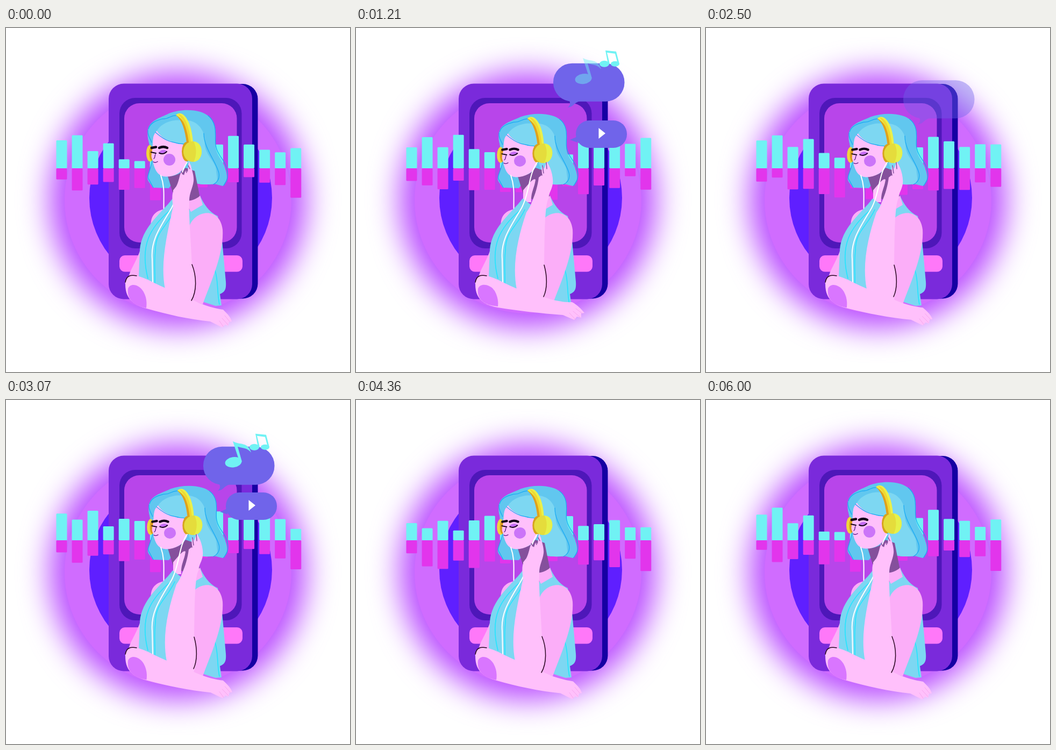
These frames come from a looping animation (640x640 px, 6.07 s). An HTML page:

```html
<!DOCTYPE html>
<html lang="en">
<head>
<meta charset="utf-8">
<title>Listening to music</title>
<style>
  html, body { margin: 0; width: 100%; height: 100%; overflow: hidden; background: #fff; }
  svg { display: block; width: 100%; height: 100%; }
  .hair { fill: #61c7ef; }
  .hairLight, .vest { fill: #7dd7f2; }
  .skin { fill: #ffc0fb; }
  .shade { fill: #fbaef8; }
  .dusk { fill: #85509c; }
  .bubble { fill: #7064ea; }
  .note { fill: #70f2f4; }
  .line { fill: none; stroke-linecap: round; stroke-linejoin: round; }
  .strand { stroke: #16a9f4; stroke-width: 1.2; }
  .seam { stroke: #20e6ff; stroke-width: 1.6; }
  .ink { stroke: #28051f; stroke-width: 1.5; }
  .cable { stroke: #fff; stroke-width: 2; }
</style>
</head>
<body>
<svg viewBox="0 0 640 640" xmlns="http://www.w3.org/2000/svg">
  <defs>
    <filter id="blur" x="-50%" y="-50%" width="200%" height="200%" color-interpolation-filters="sRGB">
      <feGaussianBlur stdDeviation="28"/>
    </filter>
  </defs>

  <circle cx="320" cy="320" r="238" fill="#b94aff" filter="url(#blur)"/>
  <circle cx="320" cy="320" r="211" fill="#d06cff"/>
  <circle cx="325" cy="316" r="170" fill="#5f1fff"/>

  <g id="phone">
    <rect x="400" y="104" width="68.5" height="399.5" rx="28" fill="#1500a3"/>
    <rect x="191" y="103.5" width="267" height="401" rx="28" fill="#7a2adb"/>
    <rect x="211" y="130" width="227.5" height="280" rx="29" fill="#4e17b9"/>
    <rect x="220" y="140" width="209.5" height="259" rx="28" fill="#b845ea"/>
    <rect x="211" y="423" width="229" height="30.5" rx="10" fill="#ff78f9"/>
  </g>

  <g id="bars"></g>

  <g class="head">
    <path class="hair" d="M264 190C267 171 288 167 303 159C328 149 364 151 378 165C395 180 389 205 390 222C393 240 404 246 408 262C414 278 410 290 403 294L388 290C375 292 362 291 352 289L330 262L303 298L273 297C269 288 261 285 264 275C270 262 270 250 272 242L264 205Z"/>
    <path class="hairLight" d="M325 172C352 168 368 185 370 208C367 235 389 246 391 264C392 278 396 283 388 290C374 292 362 291 352 289L336 240Z"/>
    <path class="line strand" d="M376 163C397 180 386 207 391 222C394 238 410 248 412 267C414 281 409 286 405 293M368 196C368 224 392 250 396 270C398 281 393 287 386 291M272 245C270 262 260 277 266 282L274 297"/>
  </g>

  <g id="neck">
    <path class="dusk" d="M301 276C315 276 328 270 334 260L351 266L361 316L344 325L312 312Z"/>
    <path class="skin" d="M311 302C318 294 330 278 334 282C332 298 325 305 326 324L311 324Z"/>
  </g>

  <g class="head">
    <ellipse cx="268" cy="233" rx="7" ry="15.5" fill="#efd63c"/>
    <ellipse cx="271" cy="233" rx="4.5" ry="13.5" fill="#d99a1b"/>
    <path class="skin" d="M276 190C272 206 274 220 271 234C269 242 274 245 274 252C278 267 284 276 297 276.5C314 277 329 268 336 252L338 213L300 195Z"/>
    <path class="hair" d="M264 190C262 205 266 215 272 222C272 208 274 197 281 191C288 204 308 215 338 217L341 180L316 160C291 164 270 172 264 190Z"/>
    <path class="hairLight" d="M281 191C288 178 308 169 328 172L339 217C312 217 291 206 281 191Z"/>
    <path class="line strand" d="M265 188C268 176 280 172 291 169C304 170 306 161 318 163M264 190C263 201 269 206 271 213M278 194C286 201 295 208 305 211C317 214 326 217 336 215"/>
    <path class="line" d="M271 223L279 221.5M285 223C290 220.5 296 221 300 223" stroke="#130018" stroke-width="4.5"/>
    <path d="M284 231C289 226 296 225 300 230C296 234 289 235 284 231Z" fill="#c46bf2"/>
    <path class="line" d="M285 232.500C290 235 295 234 299 230M270 231L279 233" stroke="#130018" stroke-width="2"/>
    <path class="line" d="M278 235C276 239 278 241 275 243M274 249C277 251 280 250 282 248.5" stroke="#5a1683" stroke-width="1.4"/>
    <circle cx="304" cy="245" r="11" fill="#cb74f8"/>
    <path d="M316 162C328 150 345 171 348 212L338 214C334 190 329 171 316 162Z" fill="#e9f04b"/>
    <path d="M316 162C331 169 338 187 341 213L336 214C333 190 328 172 316 162Z" fill="#dfa11d"/>
    <path d="M320 160C333 161 341 184 344 212L340 212C337 187 329 168 320 160Z" fill="#f1d82f"/>
    <ellipse cx="336" cy="230" rx="9" ry="18" fill="#d7a31c"/>
    <ellipse cx="347" cy="230" rx="17" ry="19" fill="#e5dc3c"/>
    <path d="M349 211C369 212 369 248 349 249C355 238 355 222 349 211Z" fill="#e6f04a"/>
  </g>

  <g id="body">
    <path class="line cable" d="M288 274C297 300 292 318 294 344"/>
    <path class="shade" d="M299 337C280 337 267 350 270 370L252 405C246 430 231 448 228 464L252 470L290 400Z"/>
    <path class="vest" d="M310 317C294 340 252 370 249 412L247 462L294 486L390 517L401 516L398 495C407 491 410 487 409 472L402 395L394 350C377 342 367 326 361 312L340 340Z"/>
    <path class="shade" d="M333 322C345 322 355 318 361 312L366 329L344 342Z"/>
    <path class="line seam" d="M304 340C270 370 248 402 264 466M314 338C298 372 278 378 278 414C275 440 278 456 277 476M385 440C396 465 392 490 397 514"/>
    <path class="shade" d="M341 369C352 338 398 332 403 375C406 420 380 475 366 514L340 505Z"/>
    <path class="line cable" d="M337 250C321 272 323 307 308 335C286 372 269 395 272 430L273 474"/>
  </g>

  <g id="arms">
    <path id="raisedArm" class="skin"/>
    <path id="fingers" class="line" stroke="#85509c" stroke-width="1.5"/>
    <path id="restingArm" class="skin"/>
    <path id="knuckles" class="line" stroke="#f6a7ee"/>
    <path id="elbow" fill="#d976ff"/>
    <path class="line ink" d="M222 473C224 461 231 459 243 461"/>
    <path id="crease" class="line ink"/>
  </g>

  <g id="playBubble">
    <path class="bubble" d="M412 202L398 208L412 213Z"/>
    <rect class="bubble" x="409" y="172" width="95" height="51" rx="25"/>
    <path d="M451.5 186V206L464 196Z" fill="#fff"/>
  </g>
  <g id="musicBubble">
    <path class="bubble" d="M394 151C401 160 398 165 394 168C406 167 404 159 418 156Z"/>
    <rect class="bubble" x="367" y="86" width="132.5" height="71" rx="35"/>
  </g>
  <g id="notes">
    <g id="bigNote" class="note">
      <ellipse cx="423" cy="115" rx="15.5" ry="9.5" transform="rotate(-8 423 115)"/>
      <path d="M434 113L422 76C435 84 450 76 456 97C449 88 440 89 431 86L439 114Z"/>
    </g>
    <g id="smallNotes" class="note">
      <ellipse cx="462" cy="87" rx="9" ry="6"/>
      <ellipse cx="482" cy="87" rx="8" ry="5"/>
      <path d="M469 88L464 62L484 64L490 87L487 87L482 68L467 66L472 87Z"/>
    </g>
  </g>
</svg>

<script>
const LOOP = 6070, FPS = 14, FRAMES = 85;
const BUBBLE_CYCLE = LOOP / 3;
const BAR_COUNT = 16, BASELINE = 261;
const TAU = Math.PI * 2;
const $ = id => document.getElementById(id);
const set = (el, attrs) => { for (const k in attrs) el.setAttribute(k, attrs[k]); };
const lerp = (a, b, k) => a + (b - a) * k;

// Eased 0 to 1 between two times.
function ramp(t, from, to) {
  const k = Math.min(1, Math.max(0, (t - from) / (to - from)));
  return k * k * (3 - 2 * k);
}

// Exponential fall from 1, starting at a given time.
const decay = (t, from, span) => Math.exp(-Math.max(0, t - from) / span);

// Blends two path strings that share the same commands.
function blend(a, b, k) {
  const targets = b.match(/[\d.]+/g);
  let i = 0;
  return a.replace(/[\d.]+/g, n => lerp(+n, +targets[i++], k).toFixed(2));
}

let seed = 7;
const random = () => (seed = seed * 16807 % 2147483647) / 2147483647;

function addBar(i, fill) {
  const bar = document.createElementNS("http://www.w3.org/2000/svg", "rect");
  set(bar, { x: 93.5 + i * 29.05, width: 20, rx: 1.5, fill });
  $("bars").append(bar);
  return bar;
}
const bars = Array.from({ length: BAR_COUNT }, (_, i) => ({
  top: addBar(i, "#70f2f4"),
  bottom: addBar(i, "#e235ec"),
  topPhase: random() * TAU,
  bottomPhase: random() * TAU
}));

// A swell rocks along the row while every bar beats on its own phase.
function drawBars(t) {
  const turn = t / LOOP * TAU;
  const shift = .25 * Math.sin(turn);
  bars.forEach((bar, i) => {
    const swell = Math.cos(TAU * (i / 11 - shift));
    const up = 38 + 14 * swell + 12 * Math.sin(5 * turn + bar.topPhase);
    const down = 37 - 10 * swell + 13 * Math.sin(4 * turn + bar.bottomPhase);
    set(bar.top, { y: BASELINE - up, height: up });
    set(bar.bottom, { y: BASELINE, height: down });
  });
}

const heads = document.querySelectorAll(".head");

function drawHead(t) {
  const pivot = 296;
  const nod = ramp(t, 0, 640) - ramp(t, 4900, 6000);
  const scale = 1 - .048 * nod, skew = .02 * nod;
  const transform = `matrix(1 0 ${-skew} ${scale} ${skew * pivot} ${pivot * (1 - scale)})`;
  heads.forEach(head => set(head, { transform }));
}

const handPoses = {
  raisedArm: [
    "M296 486C287 440 298 390 311 332C307 308 311 302 316 296C322 286 322 276 326 268L331 274L334 264L338 268L340 248L344 256C346 266 350 274 349 285C347 300 340 308 341 325C340 350 343 380 346 440C355 462 354 490 346 510Z",
    "M299 486C290 440 301 390 317 343C322 336 325 330 327 324C334 308 338 294 340 278L345 274L346 256L350 262L355 248L361 260C365 270 367 280 366 290C364 302 358 308 359 316C351 325 351 380 350 440C356 462 356 490 348 510Z"
  ],
  fingers: [
    "M326 267L329 272M333 262L336 269M339 256L342 262",
    "M344 264L346 274M347 256L349 270M354 250L355 262"
  ],
  crease: [
    "M346 440C355 462 355 490 345 507",
    "M350 441C356 462 356 485 349 500"
  ]
};
const restPoses = {
  restingArm: [
    "M222 477C220 463 230 460 243 461C261 465 279 477 297 484L346 505C365 516 390 522 404 524C412 532 418 538 420 546L415 547L413 554L408 552L402 557L380 546C340 542 300 533 262 522C235 515 222 502 222 477Z",
    "M222 477C220 463 230 460 243 461C261 465 279 477 297 484L349 500C365 507 390 511 402 510C412 515 420 524 425 530L419 531L419 539L411 537L406 543L385 534C345 531 300 526 264 520C235 515 222 502 222 477Z"
  ],
  knuckles: [
    "M402 540L413 552M397 545L404 555M407 535L416 546",
    "M404 527L417 538M397 530L408 542M409 522L421 531"
  ],
  elbow: [
    "M227 485C231 474 247 476 256 491C262 502 262 512 261 521C241 517 224 507 227 485Z",
    "M227 485C231 474 249 476 258 489C264 500 265 510 264 518C241 516 224 507 227 485Z"
  ]
};

function applyPoses(poses, k) {
  for (const id in poses) $(id).setAttribute("d", blend(...poses[id], k));
}

function drawArms(t) {
  applyPoses(handPoses, ramp(t, 70, 640) - ramp(t, 3210, 3720));
  applyPoses(restPoses, ramp(t, 0, 640) * decay(t, 1210, 1000));
}

// Bubbles spring in, rest, then drift up and fade.
function drawBubbles(t) {
  const phase = t % BUBBLE_CYCLE;
  const visible = (from, to, out, gone) => ramp(phase, from, to) - ramp(phase, out, gone);
  const spring = 34 * decay(phase, 380, 180) * Math.cos((phase - 380) / 100);
  const drift = 40 * (1 - decay(phase, 1060, 220));
  const transform = `translate(0 ${spring - drift})`;
  const playOffset = 44 * (1 - ramp(phase, 740, 1000)) - 14 * ramp(phase, 1300, 1560);

  set($("musicBubble"), { transform, opacity: visible(380, 600, 1600, 1900) });
  set($("notes"), { transform });
  set($("bigNote"), { opacity: visible(600, 760, 1130, 1290) });
  set($("smallNotes"), { opacity: visible(640, 800, 1230, 1420) });
  set($("playBubble"), { transform: `translate(0 ${playOffset})`, opacity: visible(740, 930, 1300, 1560) });
}

function draw(now) {
  const frame = Math.floor(now % LOOP / LOOP * FRAMES + .07);
  const t = frame % FRAMES * 1000 / FPS;
  drawBars(t);
  drawHead(t);
  drawArms(t);
  drawBubbles(t);
}

const start = performance.now();
function tick() {
  draw(performance.now() - start);
  requestAnimationFrame(tick);
}
tick();
</script>
</body>
</html>
```
